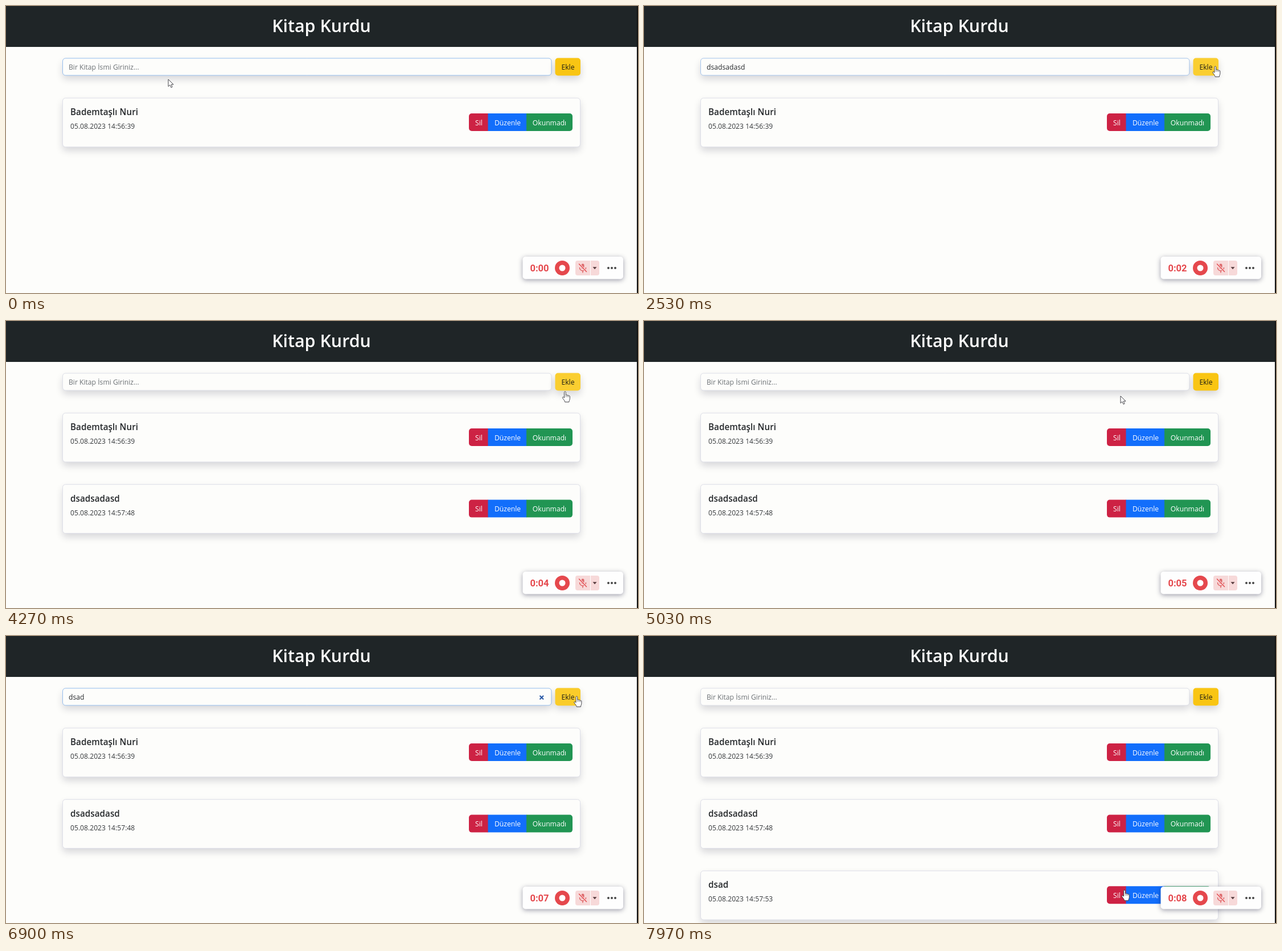
These frames come from a looping animation (1110 by 505 pixels, 8 s). An HTML page with a canvas:

```html
<!DOCTYPE html>
<html lang="tr">
<head>
<meta charset="utf-8">
<title>Kitap listesi</title>
<style>
  html, body { margin: 0; width: 100%; height: 100%; overflow: hidden; background: #fdfdfb; }
  canvas { display: block; }
</style>
</head>
<body>
<canvas id="stage" width="1110" height="505"></canvas>
<script>
const ctx = document.getElementById('stage').getContext('2d');
const LOOP = 8000;
const SANS = '"Open Sans", "Noto Sans", sans-serif';
const BODY = `12.15px ${SANS}`;
const INK = '#25282b';
const PAPER = '#fdfdfb';

const cards = [
  { at: 0, title: 'Bademtaşlı Nuri', date: '05.08.2023 14:56:39' },
  { at: 2600, title: 'dsadsadasd', date: '05.08.2023 14:57:48' },
  { at: 7090, title: 'dsad', date: '05.08.2023 14:57:53' }
];
const entries = [
  { text: 'dsadsadasd', start: 960, step: 105, end: 2600 },
  { text: 'dsad', start: 6050, step: 100, end: 7090 }
];
const focusSpans = [[-600, 2500], [5560, 7000]];
const hoverSpans = [[2380, 4270], [6780, 7400]];
const hiddenSpans = [[960, 2030], [6050, 6550]];

// Pointer path: time, x, y
const path = [
  [0, 285, 129], [2030, 285, 129], [2460, 1003.5, 106], [4020, 1003.5, 106],
  [4270, 982, 124], [4620, 880, 143], [5030, 837, 132], [5520, 420, 110],
  [6550, 420, 110], [6870, 1002.5, 106], [7260, 1002.5, 106],
  [7600, 890, 360], [7900, 844, 447], [8000, 844, 447]
];

const clamp = v => Math.max(0, Math.min(1, v));
const within = (t, [a, b]) => t >= a && t < b;
const inBox = (p, x0, y0, x1, y1) => p.x >= x0 && p.x <= x1 && p.y >= y0 && p.y <= y1;

// Strength of a state that fades in and out over 150 ms
function fade(t, spans) {
  return Math.max(...spans.map(([a, b]) => Math.min(clamp((t - a) / 150), 1 - clamp((t - b) / 150))));
}

function mix(from, to, k) {
  return `rgb(${from.map((v, i) => Math.round(v + (to[i] - v) * k)).join()})`;
}

function pointerAt(t) {
  const i = Math.max(1, path.findIndex(p => p[0] > t));
  const [t0, x0, y0] = path[i - 1], [t1, x1, y1] = path[i];
  const k = clamp((t - t0) / (t1 - t0)), e = k * k * (3 - 2 * k);
  return { x: x0 + (x1 - x0) * e, y: y0 + (y1 - y0) * e };
}

function box(x, y, w, h, radius, fill, stroke) {
  ctx.beginPath();
  ctx.roundRect(x, y, w, h, radius);
  if (fill) { ctx.fillStyle = fill; ctx.fill(); }
  if (stroke) { ctx.strokeStyle = stroke; ctx.lineWidth = 1; ctx.stroke(); }
}

function shadowed(draw, dy = 6.5, blur = 13, color = 'rgba(15,15,45,.16)') {
  ctx.save();
  ctx.shadowColor = color;
  ctx.shadowBlur = blur;
  ctx.shadowOffsetY = dy;
  draw();
  ctx.restore();
}

function label(str, x, y, font = BODY, color = INK, align = 'left') {
  ctx.font = font;
  ctx.fillStyle = color;
  ctx.textAlign = align;
  ctx.fillText(str, x, y);
}

function disc(x, y, r, color) {
  ctx.fillStyle = color;
  ctx.beginPath();
  ctx.arc(x, y, r, 0, Math.PI * 2);
  ctx.fill();
}

function line(d, color, width) {
  ctx.strokeStyle = color;
  ctx.lineWidth = width;
  ctx.stroke(new Path2D(d));
}

function drawPage() {
  ctx.fillStyle = PAPER;
  ctx.fillRect(0, 0, 1110, 505);
  ctx.fillStyle = '#1f2527';
  ctx.fillRect(0, 0, 1108, 72);
  ctx.fillStyle = '#111';
  ctx.fillRect(1108, 0, 2, 505);
  label('Kitap Kurdu', 554, 46, `600 30.4px ${SANS}`, '#fdfdfd', 'center');
}

function drawInput(t) {
  const focus = fade(t, focusSpans);
  const active = focusSpans.find(s => within(t, s));
  const entry = entries.find(e => within(t, [e.start, e.end]));
  const count = entry ? Math.min(entry.text.length, Math.floor((t - entry.start) / entry.step) + 1) : 0;
  const typed = entry ? entry.text.slice(0, count) : '';

  shadowed(() => box(99.5, 92, 858.5, 30, 5, PAPER));
  box(99.5, 92, 858.5, 30, 5, null, mix([222, 224, 232], [150, 190, 238], focus));
  if (typed) label(typed, 110, 111.5);
  else label('Bir Kitap İsmi Giriniz...', 110, 111.5, BODY, '#6b7074');
  if (!active) return;

  if (typed) line('M937.5 105l6.5 6.5m0-6.5l-6.5 6.5', '#2857a4', 2);
  const lastKey = entry ? entry.start + (count - 1) * entry.step : active[0];
  if (Math.floor((t - lastKey) / 530) % 2 === 0) {
    ctx.font = BODY;
    ctx.fillStyle = '#222';
    ctx.fillRect(Math.round(110 + ctx.measureText(typed).width), 99, 1, 16);
  }
}

function drawAddButton(t) {
  const fill = mix([249, 197, 19], [250, 206, 48], fade(t, hoverSpans));
  shadowed(() => box(964.5, 91.5, 44.5, 31, 5, fill));
  label('Ekle', 987, 111.5, BODY, '#1c1c14', 'center');
}

function drawCard({ title, date }, i) {
  ctx.save();
  ctx.translate(0, i * 125.6);
  shadowed(() => box(99.5, 162, 909, 86, 5, PAPER));
  box(99.5, 162, 909, 86, 5, null, '#dedfe8');
  label(title, 113, 192, `600 15.25px ${SANS}`);
  label(date, 113, 216, BODY, '#34373a');
  box(813, 189, 34, 31, [5, 0, 0, 5], '#cd2244');
  box(846.5, 189, 68, 31, 0, '#126efb');
  box(914, 189, 81, 31, [0, 5, 5, 0], '#219553');
  label('Sil', 830.5, 209.5, BODY, '#fff', 'center');
  label('Düzenle', 881, 209.5, BODY, '#fff', 'center');
  label('Okunmadı', 954.5, 209.5, BODY, '#fff', 'center');
  ctx.restore();
}

function drawRecorder(t) {
  const red = '#e5484d', pink = '#f7d9d9';
  shadowed(() => box(907.5, 441, 176.5, 39.5, 5, '#fefefe'), 2, 9, 'rgba(25,25,60,.42)');
  label(`0:0${Math.floor((t + 120) / 1000)}`, 937, 467, 'bold 16.5px Roboto, sans-serif', red, 'center');
  disc(977, 461, 13, red);
  disc(977, 461, 5.5, '#fff');
  box(1000, 448, 26, 26, [4, 0, 0, 4], pink);
  box(1027, 448, 15, 26, [0, 4, 4, 0], pink);
  ctx.lineCap = 'round';
  box(1010.5, 453.5, 5, 9.5, 2.5, '#dc6b6d');
  line('M1007.5 460.5a5.5 5.5 0 0 0 11 0M1013 466v3', '#dc5558', 1.3);
  line('M1006.5 454l13 13.5', pink, 3.4);
  line('M1006.5 454l13 13.5', red, 1.4);
  ctx.lineCap = 'butt';
  ctx.fillStyle = '#54393b';
  ctx.fill(new Path2D('M1030.5 459.3h7l-3.5 3.9z'));
  for (const x of [1058, 1064, 1070]) disc(x, 461, 2, '#484848');
}

const arrow = new Path2D('M0 0V12.6L2.9 9.9 5 14.5 7.1 13.5 5.1 9.1H9.1Z');
const hand = new Path2D('M-1.5 1.5C-1.5-.3 1.2-.3 1.2 1.5V6.4C1.8 5.5 3.6 5.7 3.7 6.9 4.5 6.2 5.9 6.5 6 7.6 7 7 8.3 7.5 8.3 8.8V12.5C8.3 15 6.9 16 6.8 18.6H-.3C-.5 16-2.8 14.3-4.4 11.6-5.3 10-3.6 8.9-2.4 10.2L-1.5 11.2Z');

function drawPointer(t) {
  if (hiddenSpans.some(s => within(t, s))) return;
  const p = pointerAt(t);
  const onButtons = cards.some((c, i) => t >= c.at && inBox(p, 813, 189 + i * 125.6, 995, 220 + i * 125.6));
  ctx.save();
  ctx.translate(p.x, p.y);
  ctx.lineJoin = 'round';
  if (inBox(p, 99, 92, 958, 122)) {
    line('M-3-7h2.5M.5-7H3M0-6.5v13M-3 7h2.5M.5 7H3', '#333', 1);
  } else {
    const shape = onButtons || inBox(p, 965, 91, 1009, 125) ? hand : arrow;
    ctx.fillStyle = '#fff';
    ctx.fill(shape);
    ctx.strokeStyle = '#333338';
    ctx.lineWidth = .9;
    ctx.stroke(shape);
    if (shape === hand) line('M1.2 6.5v3.4M3.7 7v3M6 7.8v2.4', '#555', .7);
  }
  ctx.restore();
}

function frame(now) {
  const t = now % LOOP;
  drawPage();
  drawInput(t);
  drawAddButton(t);
  cards.forEach((card, i) => { if (t >= card.at) drawCard(card, i); });
  drawRecorder(t);
  drawPointer(t);
  requestAnimationFrame(() => frame(performance.now() - startTime));
}

const startTime = performance.now();
frame(0);
</script>
</body>
</html>
```
